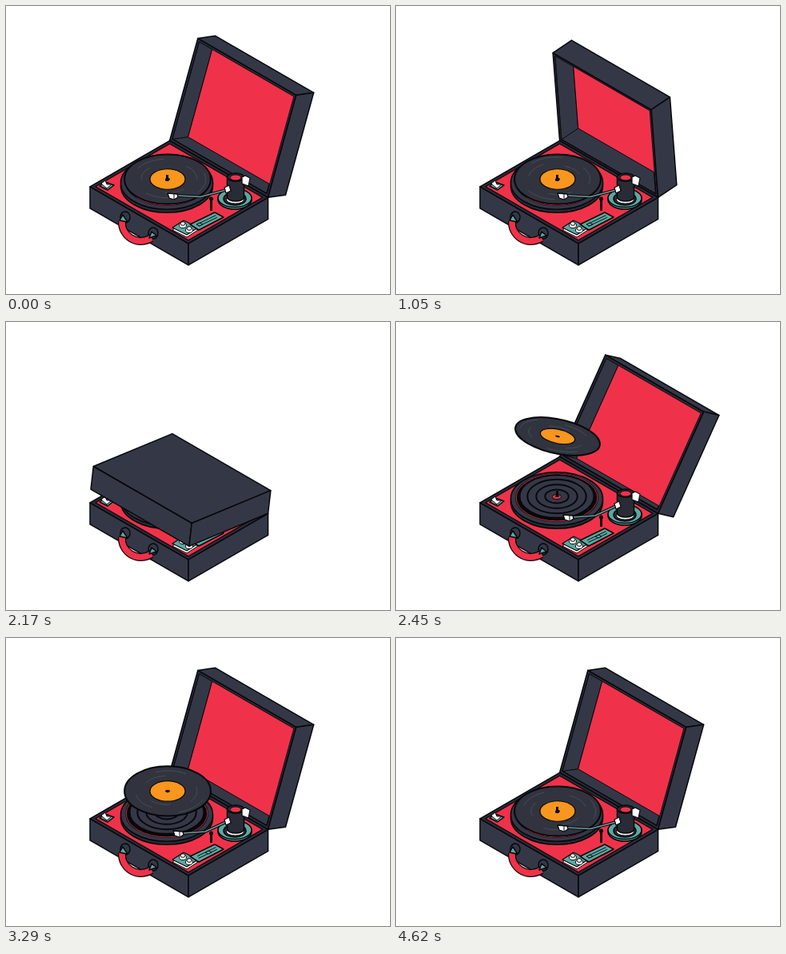
An HTML page with a canvas for the animation above (4690 ms loop, 480x360 px).

```html
<!DOCTYPE html>
<html>
<head>
<meta charset="utf-8">
<style>
  html, body { margin: 0; overflow: hidden; background: #fff; }
  canvas { display: block; }
</style>
</head>
<body>
<canvas id="stage" width="480" height="360"></canvas>
<script>
const ctx = document.getElementById('stage').getContext('2d');
const LOOP = 4690, TAU = Math.PI * 2;
const INK = '#07070b', NAVY = '#343846', DARK = '#292b36', RED = '#ef3249',
      TEAL = '#5ba8a0', ORANGE = '#f8961e', WHITE = '#fff';

// Isometric space: u runs along the hinge, v towards the handle, z up.
const W = 142, D = 115, H = 27, COS = 0.866, DISC = 44;
const iso = (u, v, z) => [204.6 + COS * (u - v), 168.3 + (u + v) / 2 - z];

const clamp = x => Math.min(1, Math.max(0, x));
const span = (t, from, to) => clamp((t - from) / (to - from));
const inOut = x => x < 0.5 ? 2 * x * x : 1 - 2 * (1 - x) ** 2;
const mix = (a, b, k) => a + (b - a) * k;

function trace(points) {
  ctx.beginPath();
  points.forEach(p => ctx.lineTo(...p));
}
function paint(fill, width = 1.5) {
  if (fill) { ctx.fillStyle = fill; ctx.fill(); }
  if (width) stroke(INK, width);
}
function stroke(color, width) {
  ctx.strokeStyle = color;
  ctx.lineWidth = width;
  ctx.stroke();
}
function poly(fill, points, width) {
  trace(points);
  ctx.closePath();
  paint(fill, width);
}
function line(color, width, points) {
  trace(points);
  stroke(color, width);
}
function oval(fill, x, y, rx, ry, width) {
  ctx.beginPath();
  ctx.ellipse(x, y, rx, ry, 0, 0, TAU);
  paint(fill, width);
}
// Circle path lying in the plane of u and v, tilted about u.
function ring(x, y, r, tilt = 0, from = 0, to = TAU) {
  const c = Math.cos(tilt), s = Math.sin(tilt);
  ctx.save();
  ctx.transform(COS, 0.5, -COS * c, 0.5 * c - s, x, y);
  ctx.beginPath();
  ctx.arc(0, 0, r, from, to);
  ctx.restore();
}

function lidAngle(t) {
  const open = 110.7, over = 125;
  if (t < 1185) return open * (1 - span(t, 905, 1185) ** 2.25);
  if (t < 2450) return over * inOut(span(t, 2110, 2450));
  return mix(over, open, inOut(span(t, 2450, 2870)));
}

function drawLid(degrees) {
  const angle = degrees * Math.PI / 180, c = Math.cos(angle), s = Math.sin(angle);
  const at = (u, a, b) => iso(u, a * c - b * s, a * s + b * c);
  if (c > s) {
    poly(NAVY, [at(0, 0, H), at(W, 0, H), at(W, D, H), at(0, D, H)]);
  } else {
    const i = 3, b = 24, u = W - i, a = D - i;
    poly(DARK, [at(0, 0, 0), at(W, 0, 0), at(W, D, 0), at(0, D, 0)]);
    ctx.save();
    poly(NAVY, [at(i, i, 0), at(u, i, 0), at(u, a, 0), at(i, a, 0)]);
    ctx.clip();
    poly(NAVY, [at(i, i, 0), at(i, a, 0), at(i, a, b), at(i, i, b)], 1);
    poly(RED, [at(i, i, b), at(u, i, b), at(u, a, b), at(i, a, b)], 1);
    ctx.restore();
  }
  if (c + s > 0) poly(NAVY, [at(0, D, 0), at(W, D, 0), at(W, D, H), at(0, D, H)]);
  poly(NAVY, [at(W, 0, 0), at(W, D, 0), at(W, D, H), at(W, 0, H)]);
}

function drawHandle(metal) {
  for (const [x, y] of [[149, 264], [184, 284]]) oval(NAVY, x, y, 6, 7);
  const grip = (color, width) => {
    ctx.beginPath();
    ctx.moveTo(145, 269);
    ctx.bezierCurveTo(144, 286, 162, 301, 182, 290);
    stroke(color, width);
  };
  grip(INK, 10);
  grip(metal === TEAL ? RED : '#d52b3f', 7.5);
  poly(metal, [[142, 268], [146, 261], [152, 270]]);
  poly(metal, [[179, 290], [182, 282], [188, 287]]);
}

function drawBase(closed) {
  poly(NAVY, [iso(0, D, 0), iso(W, D, 0), iso(W, D, -H), iso(0, D, -H)]);
  poly(NAVY, [iso(W, 0, 0), iso(W, D, 0), iso(W, D, -H), iso(W, 0, -H)]);
  poly(DARK, [iso(0, 0, 0), iso(W, 0, 0), iso(W, D, 0), iso(0, D, 0)]);
  const i = 4;
  poly(RED, [iso(i, i, 0), iso(W - i, i, 0), iso(W - i, D - i, 0), iso(i, D - i, 0)], 1.2);
  drawHandle(closed ? '#a3a5a8' : TEAL);
}

function drawControls(slide) {
  poly(TEAL, [[117, 225], [124, 220], [135, 224], [127, 230]]);
  poly(WHITE, [[119, 222], [124, 218], [126, 223], [132, 223], [126, 228]], 1);

  const panel = [[208, 277], [222, 268], [240, 277], [226, 286]];
  poly(WHITE, panel.map(([x, y]) => [x, y + 3]), 1);
  poly(TEAL, panel, 1.2);
  for (const [x, y] of [[221, 274], [229, 280]]) {
    oval(WHITE, x, y, 4.5, 3.5, 1);
    oval(WHITE, x, y - 2, 3, 2.3, 1);
  }
  poly(TEAL, [[230, 273], [261, 258], [272, 264], [241, 280]]);
  line(INK, 4, [[240, 274], [263, 263]]);
  line(TEAL, 2, [[240, 274], [263, 263]]);
  const x = mix(242, 253, slide), y = mix(273, 268, slide);
  poly(TEAL, [[x - 4, y], [x, y - 2], [x + 4, y], [x, y + 2]], 1);
}

function drawPlatter() {
  const x = 201;
  ring(x, 225, 47);
  paint(DARK);
  ring(x, 221, 47);
  paint(NAVY);
  ring(x, 219.5, 41.5);
  paint(INK, 2);
  stroke('#c42c40', 1);
  for (const r of [38, 30, 21, 12]) {
    ring(x, 218, r);
    paint(NAVY, 2);
  }
  ring(x, 218.5, 4.5);
  paint(RED, 1);
}

function drawSpindle() {
  line(INK, 3, [[201.5, 211], [201.5, 217]]);
  oval(INK, 201.5, 217.5, 2.6, 1.5, 0);
}

function drawDisc(height, tilt, spin) {
  const x = 202, y = 216.5 - height;
  ring(x, y, DISC, tilt);
  paint('#31343f', 2);
  for (let i = 0; i < 6; i++) {
    const start = spin + i * 2.3;
    ring(x, y, 24 + i * 3, tilt, start, start + 0.9);
    stroke('#4b525c', 0.8);
  }
  ring(x, y, 18, tilt);
  paint(ORANGE, 1.2);
  ring(x, y, 2.3, tilt);
  paint(INK, 0);
}

function drawArm(k) {
  line(INK, 3, [[256.5, 243], [256.5, 256]]);
  oval(INK, 256.5, mix(244, 241, k), 2.5, 2.5, 0);

  oval(TEAL, 286, 242, 21, 12);
  oval(TEAL, 286, 240, 21, 11.5);
  oval(DARK, 286, 241, 14, 8);
  oval(WHITE, 286.5, 242, 11, 5, 1);

  trace([[276.5, 214], [276.5, 239]]);
  ctx.ellipse(287, 239, 10.5, 5, 0, Math.PI, 0, true);
  ctx.lineTo(297.5, 214);
  ctx.closePath();
  paint(DARK);
  oval(DARK, 287, 214, 10.5, 5);
  oval(RED, 287, 214.5, 6.8, 3.6, 1);
  poly(WHITE, [[295, 214], [299, 212], [305, 215], [303, 225], [295, 222]], 1.2);

  const hx = mix(215, 208, k), hy = mix(245, 238, k);
  const tube = [[hx + 6, hy - 1], [mix(249, 243, k), mix(242, 238.5, k)], [275, 230]];
  line(INK, 3.6, tube);
  line('#6f9c9c', 1.4, tube);
  poly(WHITE, [[273, 227], [279, 224], [281, 231], [275, 234]], 1.2);
  poly(WHITE, [[hx - 6, hy - 4], [hx + 6, hy - 3], [hx + 7, hy + 1], [hx + 2, hy + 4], [hx - 4, hy + 2]], 1.3);
  line(INK, 1, [[hx + 2, hy - 3], [hx + 2, hy + 3]]);
}

function draw(t) {
  const lid = lidAngle(t), lidBehind = lid > 85;
  const rise = 1 - (1 - span(t, 2200, 2750)) ** 2.5;
  const height = 94 * rise * (1 - span(t, 2750, 3350) ** 3);
  const tilt = TAU * inOut(span(t, 2313, 3244));
  const spin = t / LOOP * TAU * 3;
  const playing = t < 1185 ? 1 : inOut(span(t, 3400, 3700));
  const slide = t < 1185 ? 0 : 1 - inOut(span(t, 3850, 4300));

  ctx.clearRect(0, 0, 480, 360);
  ctx.lineJoin = 'round';
  if (lidBehind) drawLid(lid);
  drawBase(lid === 0);
  drawControls(slide);
  drawPlatter();
  const flying = height > 1;
  if (!flying) drawDisc(0, 0, spin);
  drawSpindle();
  drawArm(playing);
  if (flying) drawDisc(height, tilt, spin);
  if (!lidBehind) drawLid(lid);
}

function tick() {
  draw(performance.now() % LOOP);
  requestAnimationFrame(tick);
}
tick();
</script>
</body>
</html>
```
